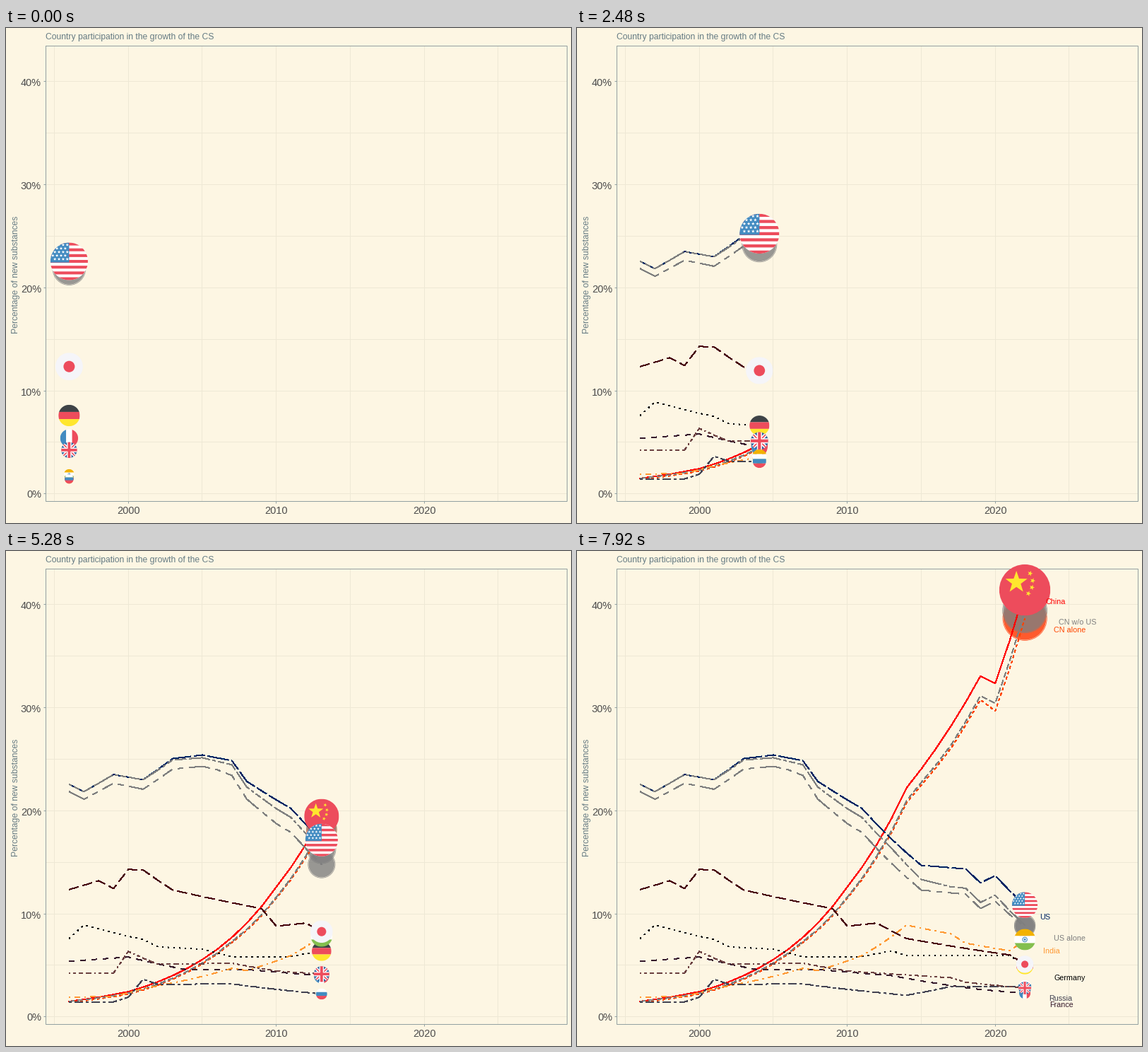
Animation of 800 by 700 pixels, one loop 8000 ms. Source, as a matplotlib script:

```python
import numpy as np
import matplotlib.pyplot as plt
from matplotlib.animation import FuncAnimation
from matplotlib.patches import Circle, PathPatch
from matplotlib.path import Path
from matplotlib.transforms import Affine2D

W, H = 800, 700
PX = 0.72  # points per pixel at 100 dpi
FRAMES, INTERVAL = 100, 80
YEARS = np.arange(1996, 2023)
LAST = len(YEARS) - 1

CREAM, GRID, BORDER, MUTED = "#fdf6e3", "#eee8d5", "#93a1a1", "#657b83"
RED, BLUE, WHITE, YELLOW = "#ed4c5c", "#428bc1", "#ffffff", "#ffe62e"
GREY, ORANGE = "#7f7f7f", "#ff4500"

plt.rcParams["font.family"] = "Liberation Sans"
fig = plt.figure(figsize=(W / 100, H / 100), dpi=100, facecolor=CREAM)
ax = fig.add_axes([0, 0, 1, 1])
ax.set_xlim(0, W)
ax.set_ylim(H, 0)
ax.axis("off")


def px_x(year):
    return 173.2 + 20.95 * (year - 2000)


def px_y(value):
    return 658.8 - 14.58 * value


def center(v):
    return np.floor(v) + 0.5


def text(x, y, s, size, color, **kw):
    return ax.text(x, y, s, fontsize=size * PX, color=color, **kw)


def rule(xs, ys, color, z):
    ax.plot(xs, ys, color=color, lw=PX, snap=False, zorder=z,
            solid_capstyle="butt", solid_joinstyle="miter")


# ---- panel, grid and axes ----
LEFT, RIGHT, TOP, BOTTOM = 56.5, 794.5, 25.5, 669.5

for year in range(1995, 2030, 5):
    x = center(px_x(year))
    rule([x, x], [TOP, BOTTOM], GRID, 0)
    if year in (2000, 2010, 2020):
        rule([x, x], [BOTTOM, BOTTOM + 3], BORDER, 1)
        text(x, 687, str(year), 14.5, "#4d4d4d", ha="center")

for value in range(0, 45, 5):
    y = center(px_y(value))
    rule([LEFT, RIGHT], [y, y], GRID, 0)
    if value % 10 == 0:
        rule([LEFT - 3, LEFT], [y, y], BORDER, 1)
        text(50, y + 6, f"{value}%", 14.5, "#4d4d4d", ha="right")

rule([LEFT, RIGHT, RIGHT, LEFT, LEFT], [TOP, TOP, BOTTOM, BOTTOM, TOP], BORDER, 1)
text(56, 16, "Country participation in the growth of the CS", 12.1, MUTED)
text(14, 348.5, "Percentage of new substances", 12.15, MUTED,
     rotation=90, ha="center", va="center")

# ---- shares in percent, from turning points ----


def gap(*points):
    """Yearly values, changing evenly between the points."""
    return np.interp(YEARS, *zip(*points))


def share(*points):
    """Yearly values, growing at a constant rate between the points."""
    years, values = zip(*points)
    return np.exp(np.interp(YEARS, years, np.log(values)))


china = share((1996, 1.5), (2000, 2.45), (2010, 12.6), (2014, 22.2),
              (2019, 33.05), (2020, 32.35), (2022, 41.4))
cn_wo_us = china - gap((1996, 0), (2007, .4), (2010, 1), (2015, 1.3), (2017, 1.85), (2022, 2))
cn_alone = cn_wo_us - gap((2010, .1), (2019, .38), (2020, .75))

us = share((1996, 22.55), (1997, 21.85), (1999, 23.5), (2001, 23), (2003, 25.05),
           (2005, 25.4), (2007, 24.85), (2008, 22.85), (2011, 20.2), (2015, 14.7),
           (2018, 14.35), (2019, 13), (2020, 13.7), (2022, 10.85))
us_wo_cn = us - gap((2001, 0), (2007, .4), (2010, .85), (2013, .9), (2017, 1.85), (2022, 1.95))
us_alone = us - gap((1996, .7), (2006, 1.15), (2010, 2.3), (2020, 2.5), (2022, 2.1))

france = share((1996, 5.4), (2000, 5.8), (2004, 4.55), (2008, 4.6), (2013, 4), (2019, 2.65),
               (2022, 2.3))
germany = share((1996, 7.6), (1997, 8.9), (2001, 7.5), (2002, 6.8), (2005, 6.55), (2007, 5.85),
                (2011, 5.85), (2013, 6.4), (2014, 5.95), (2021, 5.95), (2022, 4.95))
india = share((1996, 1.9), (1999, 2), (2001, 2.75), (2007, 4.7), (2008, 4.5), (2011, 5.95),
              (2014, 8.9), (2017, 8.05), (2018, 7.15), (2021, 6.4), (2022, 7.5))
japan = share((1996, 12.35), (1998, 13.2), (1999, 12.45), (2000, 14.3), (2001, 14.25),
              (2003, 12.3), (2009, 10.5), (2010, 8.8), (2012, 9.1), (2014, 7.6),
              (2021, 6), (2022, 5.1))
russia = share((1999, 1.45), (2000, 1.9), (2001, 3.65), (2002, 3.15), (2007, 3.2),
               (2014, 2.1), (2017, 2.95), (2022, 2.95))
uk = share((1999, 4.25), (2000, 6.35), (2002, 5.1), (2007, 5.2), (2010, 4.45), (2017, 3.8),
           (2018, 3.35), (2022, 2.8))

# ---- flags, drawn inside a unit circle with y pointing down ----


def box(x0, y0, x1, y1):
    return Path([(x0, y0), (x1, y0), (x1, y1), (x0, y1), (x0, y0)], closed=True)


def star(x, y, r, turn=0):
    a = np.radians(turn - 90 + 36 * np.arange(11))
    rad = r * np.where(np.arange(11) % 2, 0.4, 1)
    return Path(np.c_[x + rad * np.cos(a), y + rad * np.sin(a)], closed=True)


def disc(r):
    return Path(Path.unit_circle().vertices * r, Path.unit_circle().codes)


def join(paths):
    return Path.make_compound_path(*paths)


def bands(top, mid, low):
    t = 1 / 3
    return [(box(-1, -1, 1, -t), top), (box(-1, -t, 1, t), mid), (box(-1, t, 1, 1), low)]


def cross(half, color, turn=0):
    arms = [box(-1.1, -half, 1.1, half), box(-half, -1.1, half, 1.1)]
    spin = Affine2D().rotate_deg(turn)
    return [(spin.transform_path(arm), color) for arm in arms]


def china_flag():
    # small stars sit on an arc around the large one
    arc = np.radians([-33, -6, 18, 43])
    small = [star(-.33 + .64 * np.cos(a), -.3 + .64 * np.sin(a), .11, 20) for a in arc]
    return [(box(-1, -1, 1, 1), RED), (join([star(-.33, -.3, .45)] + small), YELLOW)]


def india_flag():
    wheel = [(disc(.25), BLUE), (disc(.18), WHITE), (disc(.1), BLUE)]
    return bands("#f2b200", WHITE, "#83bf4f") + wheel


def france_flag():
    t = 1 / 3
    return [(box(-1, -1, -t, 1), BLUE), (box(-t, -1, t, 1), WHITE), (box(t, -1, 1, 1), RED)]


def uk_flag():
    return ([(box(-1, -1, 1, 1), "#2a5f9e")] + cross(.2, WHITE, 45) + cross(.07, RED, 45)
            + cross(.29, WHITE) + cross(.17, RED))


def us_flag():
    h = 2 / 13
    stripes = join([box(-1, -1 + 2 * k * h, 1, -1 + (2 * k + 1) * h) for k in range(7)])
    stars = join([star(-.1 - .22 * c - .11 * (r % 2), -.88 + .19 * r, .09)
                  for r in range(5) for c in range(4)])
    return [(box(-1, -1, 1, 1), WHITE), (stripes, RED),
            (box(-1, -1, 0, .06), BLUE), (stars, WHITE)]


class Flag:
    def __init__(self, values, parts):
        self.values = values
        self.place = Affine2D()
        trans = self.place + ax.transData
        for path, color in parts:
            patch = PathPatch(path, fc=color, lw=0, zorder=4, snap=False, transform=trans)
            ax.add_patch(patch)
            patch.set_clip_path(Path.unit_circle(), trans)

    def update(self, x, value, done):
        r = 5.72 * np.sqrt(value) - 0.6
        self.place.clear().scale(r).translate(x, px_y(value))


class Bubble:
    def __init__(self, values, color):
        self.values = values
        self.fill = Circle((0, 0), 1, fc=color, lw=0, alpha=0.8, zorder=2)
        self.ring = Circle((0, 0), 1, fc="none", ec=color, lw=0.8 * PX, alpha=0.8, zorder=2)
        for c in (self.fill, self.ring):
            ax.add_patch(c)

    def update(self, x, value, done):
        r = 5.07 * np.sqrt(value)
        for c, inset in ((self.fill, 1.2), (self.ring, 0.4)):
            c.center = x, px_y(value)
            c.radius = r - inset


class Trend:
    """A growing line; hex digits give dash and gap lengths in units of 2 px."""

    def __init__(self, values, color, dashes, name="", name_x=0):
        self.values = values
        # unsmoothed strokes come out about a pixel larger, so draw them leaner
        steps = [2 * int(d, 16) + (0.6 if j % 2 else -0.6) for j, d in enumerate(dashes)]
        self.line, = ax.plot([], [], color=color, lw=PX, zorder=3, antialiased=False,
                             ls=(0, steps) if steps else "-", dash_capstyle="butt")
        self.label = text(name_x, px_y(values[-1]) + 20, name, 10.7, color, zorder=9)

    def update(self, x, value, done):
        xs = np.append(px_x(YEARS[:done + 1]), x)
        ys = np.append(px_y(self.values[:done + 1]), px_y(value))
        self.line.set_data(xs, ys)


trends = [
    Trend(china, "#ff0000", "", "China", 664),
    Trend(cn_alone, ORANGE, "22", "CN alone", 675),
    Trend(cn_wo_us, GREY, "42", "CN w/o US", 682),
    Trend(france, "#35192b", "44", "France", 669),
    Trend(germany, "#000000", "13", "Germany", 676),
    Trend(india, "#ff9933", "1343", "India", 660),
    Trend(japan, "#46000c", "73"),
    Trend(russia, "#434352", "2262", "Russia", 668),
    Trend(uk, "#6b4040", "12223242"),
    Trend(us, "#002664", "F282", "US", 655),
    Trend(us_alone, GREY, "F4448444", "US alone", 675),
    Trend(us_wo_cn, GREY, "224282F2"),
]
bubbles = [Bubble(cn_alone, "#ff3300"), Bubble(cn_wo_us, GREY),
           Bubble(us_alone, GREY), Bubble(us_wo_cn, GREY)]
flags = [
    Flag(china, china_flag()),
    Flag(france, france_flag()),
    Flag(germany, bands("#3e4347", RED, YELLOW)),
    Flag(india, india_flag()),
    Flag(japan, [(box(-1, -1, 1, 1), "#f5f5f9"), (disc(.41), RED)]),
    Flag(russia, bands(WHITE, BLUE, RED)),
    Flag(uk, uk_flag()),
    Flag(us, us_flag()),
]

# Each year lands on a whole frame; motion between years is cubic in-out.
STOPS = [round(k * (FRAMES - 1) / LAST) for k in range(LAST + 1)]


def ease(t):
    return 4 * t ** 3 if t < 0.5 else 1 - 4 * (1 - t) ** 3


def draw(i):
    k = min(int(np.searchsorted(STOPS, i, side="right")) - 1, LAST - 1)
    t = ease((i - STOPS[k]) / (STOPS[k + 1] - STOPS[k]))
    x = px_x(YEARS[k] + t)
    for item in trends + bubbles + flags:
        before, after = item.values[k:k + 2]
        item.update(x, before + t * (after - before), k)
    for trend in trends:
        trend.label.set_visible(i == FRAMES - 1)
    return []


anim = FuncAnimation(fig, draw, frames=FRAMES, interval=INTERVAL, repeat=True)
plt.show()
```
